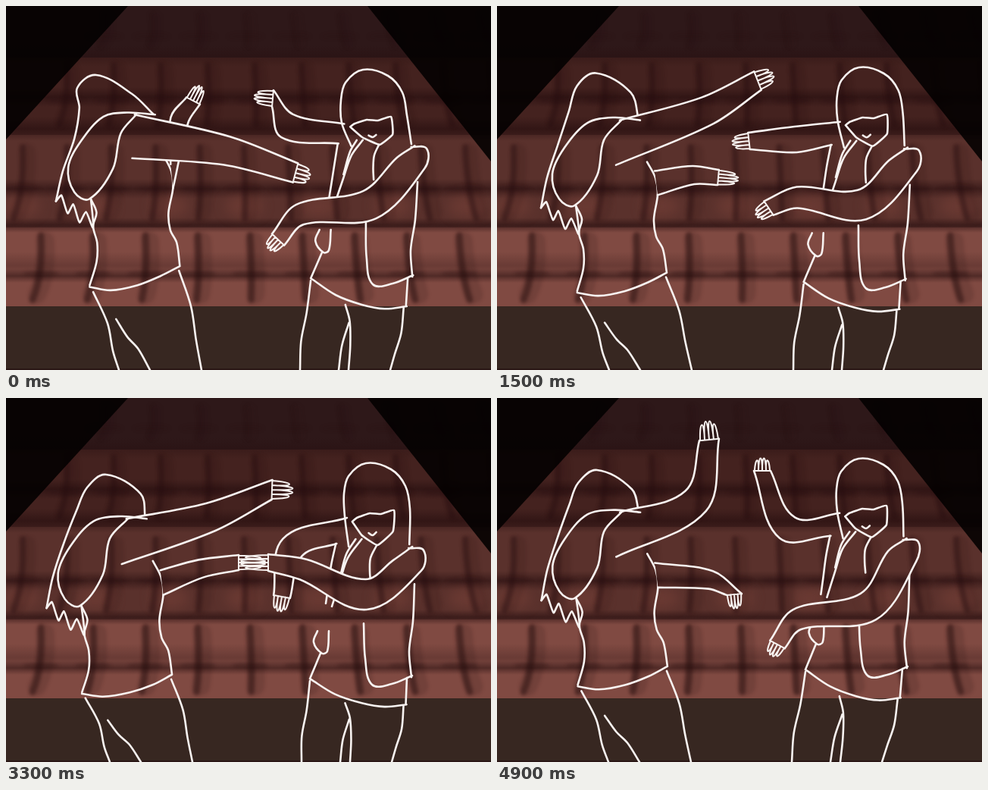
An HTML page with a canvas for the animation above (5000 ms loop, 640 by 480 pixels).

```html
<!DOCTYPE html>
<html lang="en">
<head>
<meta charset="utf-8">
<title>Two dancers</title>
<style>
html, body { margin: 0; width: 100%; height: 100%; overflow: hidden; background: #060303; }
canvas { position: absolute; left: 0; top: 0; width: 640px; height: 480px; }
</style>
</head>
<body>
<canvas id="wall" width="640" height="480"></canvas>
<canvas id="ink" width="640" height="480"></canvas>
<script>
const LOOP = 5000, STEP = 100;

// A track is a list of rows: time, then the values at that time.
const smooth = u => u * u * (3 - 2 * u);
function at(track, t) {
  const i = track.findLastIndex(row => row[0] <= t), a = track[i], b = track[i + 1] || a;
  const e = a === b ? 0 : smooth((t - a[0]) / (b[0] - a[0]));
  return a.slice(1).map((v, k) => v + (b[k + 1] - v) * e);
}
const points = text => text.split(' ').map(p => p.split(',').map(Number));

// body rows: time, head dx dy, chest dx dy, hip dx dy, feet dx
// arm rows: time, joints x y ..., hand angle, hand length
const left = {
  levels: [110, 160, 370, 480],
  body: [
    [0, -8, 4, 15, -12, 9, -13, 3],
    [1000, 7, 3, 8, -6, 8, -9, 4],
    [2000, 0, 0, 0, 0, 0, 0, 0],
    [2800, 4, 7, 2, 9, 0, -4, -5],
    [3300, 5, 14, 0, 5, -1, 9, -9],
    [4300, 21, 12, 9, 9, 3, 12, -1],
    [4900, 5, 8, 4, -4, 5, -2, 1]
  ],
  near: {
    a: points('158,153'), b: points('153,213'), half: [19, 13],
    track: [
      [0, 292, 191, 382, 220, 15, 20],
      [400, 263, 130, 289, 48, -86, 29],
      [1000, 270, 148, 366, 128, 35, 22],
      [2000, 285, 128, 322, 69, -78, 23],
      [2800, 275, 190, 357, 150, -48, 34],
      [3300, 270, 157, 351, 121, 2, 28],
      [4300, 298, 221, 352, 193, -66, 20],
      [4900, 262, 136, 280, 55, -95, 25]
    ]
  },
  far: {
    a: points('204,221'), b: points('208,253'), half: [12, 10],
    track: [
      [0, 229, 150, 247, 125, -63, 22],
      [1000, 252, 213, 296, 195, -38, 28],
      [2000, 266, 233, 288, 257, 48, 26],
      [2800, 258, 217, 282, 225, 62, 24],
      [3300, 257, 225, 307, 217, 0, 36],
      [4300, 250, 243, 272, 252, 72, 28],
      [4900, 282, 240, 313, 259, 85, 19]
    ]
  },
  strokes: [
    '194,209 205,230 208,252 203,285 206,308 215,325 220,356',
    '100,267 108,285 104,303 110,325 110,350 102,380',
    '102,382 130,386 165,380 195,369 220,356',
    '107,388 128,425 137,458 146,480',
    '219,362 237,405 246,445 255,480',
    '139,420 155,441 170,455 187,480',
    '183,152 173,113 127,87 102,104 91,140 76,187 62,230 54,270'
  ],
  sharp: ['54,270 61,262 70,286 77,274 86,298 94,284 104,305 100,267'],
  top: ['185,153 150,149 115,157 85,190 69,225 78,258 98,267 128,227 137,180 160,153']
};

const right = {
  levels: [150, 200, 375, 480],
  body: [
    [0, -4, 4, 4, -8, 0, -8, -1],
    [1000, 5, 2, 11, -9, 5, -6, 4],
    [2000, 0, 0, 0, 0, 0, 0, 0],
    [2800, 1, 2, 1, 7, 1, 2, 0],
    [3300, 0, 6, -1, 6, -1, 3, 1],
    [4300, 4, 15, 3, 8, 1, 6, 5],
    [4900, 2, 0, 4, -6, 5, -9, 0]
  ],
  near: {
    a: points('532,192 552,195 549,222'), b: points('537,190 512,208'), half: [20, 14, 11],
    track: [
      [0, 480, 262, 388, 275, 359, 308, 133, 18],
      [1000, 489, 254, 404, 217, 362, 208, 170, 22],
      [2000, 474, 270, 388, 288, 355, 325, 123, 17],
      [2800, 482, 277, 395, 316, 364, 349, 138, 15],
      [3300, 475, 259, 392, 226, 346, 217, 180, 37],
      [4300, 484, 275, 393, 264, 356, 282, 126, 19],
      [4900, 490, 275, 396, 292, 370, 325, 118, 17]
    ]
  },
  far: {
    a: points('437,186'), b: points('450,152'), half: [17, 11],
    track: [
      [0, 371, 158, 352, 122, 185, 25],
      [1000, 393, 180, 322, 200, 167, 23],
      [2000, 395, 172, 343, 156, 180, 22],
      [2800, 376, 176, 376, 90, 270, 19],
      [3300, 378, 197, 364, 262, 100, 20],
      [4300, 388, 181, 325, 175, 205, 27],
      [4900, 383, 171, 350, 96, 270, 17]
    ]
  },
  strokes: [
    '453,190 447,150 446,120 452,97 475,80 508,88 527,110 533,140 533,187',
    '479,172 484,175 489,171',
    '470,180 452,205 442,235 431,270',
    '462,180 450,200 442,230',
    '490,188 482,205 481,222 482,237',
    '436,186 430,215 426,245 423,266',
    '540,240 538,290 533,330 536,365',
    '473,293 475,340 484,375 510,374 537,363',
    '412,303 407,318 418,333 425,330 427,303',
    '416,333 409,350 402,367',
    '402,367 435,388 470,400 500,405 529,402',
    '530,366 528,402',
    '402,370 397,410 390,445 389,480',
    '448,400 454,420 455,450 453,480',
    '453,422 444,450 440,480',
    '525,404 522,435 514,460 508,480'
  ],
  sharp: ['457,157 463,152 480,146 495,147 512,142 511,170 491,188 470,175 457,157'],
  top: []
};

const g = document.getElementById('ink').getContext('2d');
g.strokeStyle = '#f8f3f1';
g.lineCap = g.lineJoin = 'round';

// Adds a smooth line through points; k sets the handle length.
function trace(p, k = 0.33, join = false) {
  const dir = i => {
    const a = p[Math.max(0, i - 1)], b = p[Math.min(p.length - 1, i + 1)];
    const d = Math.hypot(b[0] - a[0], b[1] - a[1]) || 1;
    return [(b[0] - a[0]) / d, (b[1] - a[1]) / d];
  };
  if (join) g.lineTo(...p[0]); else g.moveTo(...p[0]);
  for (let i = 0; i < p.length - 1; i++) {
    const [ax, ay] = p[i], [bx, by] = p[i + 1], u = dir(i), v = dir(i + 1);
    const h = Math.hypot(bx - ax, by - ay) * k;
    g.bezierCurveTo(ax + u[0] * h, ay + u[1] * h, bx - v[0] * h, by - v[1] * h, bx, by);
  }
}

// Shifts a point by the body offsets of the levels above and below it.
function warper({ levels, body }, t) {
  const o = [...at(body, t), 0];
  return ([x, y]) => {
    const i = Math.max(0, Math.min(2, levels.findLastIndex(l => l <= y)));
    const u = Math.max(0, Math.min(1, (y - levels[i]) / (levels[i + 1] - levels[i])));
    const mix = k => o[2 * i + k] * (1 - u) + o[2 * i + 2 + k] * u;
    return [x + mix(0), y + mix(1)];
  };
}

// Four finger loops fanned across the wrist.
function hand([x, y], half, ang, len) {
  const c = Math.cos(ang), s = Math.sin(ang);
  const place = (along, across) => [x + c * along + s * across, y + s * along - c * across];
  g.lineWidth = 2;
  g.beginPath();
  g.moveTo(...place(0, half));
  g.lineTo(...place(0, -half));
  for (let i = 0; i < 4; i++) {
    const mid = (i - 1.5) * half * 0.46, w = half * 0.23;
    const reach = len * (i % 3 ? 1.3 : 1.08), tip = mid * 0.85;
    g.moveTo(...place(0, mid - w));
    g.bezierCurveTo(...place(reach, tip - w), ...place(reach, tip + w), ...place(0, mid + w));
  }
  g.stroke();
}

// Sleeve outline around the joints; it hides whatever lies behind it.
function arm({ a, b, half, track }, warp, t) {
  const v = at(track, t), len = v.pop(), ang = v.pop() * Math.PI / 180;
  const sideA = a.map(warp), sideB = b.map(warp);
  const endA = sideA.at(-1), endB = sideB.at(-1);
  const joints = [[(endA[0] + endB[0]) / 2, (endA[1] + endB[1]) / 2]];
  for (let i = 0; i < v.length; i += 2) joints.push([v[i], v[i + 1]]);
  half.forEach((w, i) => {
    const p = joints[i], [x, y] = joints[i + 1], q = joints[i + 2];
    const dir = q ? Math.atan2(q[1] - p[1], q[0] - p[0]) : ang;
    const nx = Math.sin(dir) * w, ny = -Math.cos(dir) * w;
    sideA.push([x + nx, y + ny]);
    sideB.push([x - nx, y - ny]);
  });
  g.globalCompositeOperation = 'destination-out';
  g.beginPath();
  trace(sideA);
  trace([...sideB].reverse(), 0.33, true);
  g.fill();
  g.globalCompositeOperation = 'source-over';
  g.lineWidth = 2.6;
  g.beginPath();
  trace(sideA);
  trace(sideB);
  g.stroke();
  hand(joints.at(-1), half.at(-1), ang, len);
}

function lines(list, warp, k) {
  g.lineWidth = 2.6;
  g.beginPath();
  list.forEach(s => trace(points(s).map(warp), k));
  g.stroke();
}

function body(who, warp) {
  lines(who.strokes, warp);
  lines(who.sharp, warp, 0.1);
}

function paintWall() {
  const c = document.getElementById('wall').getContext('2d');
  const dark = a => `rgba(38,14,15,${a})`;
  const box = (color, y, h) => { c.fillStyle = color; c.fillRect(0, y, 640, h); };
  const blot = (color, x, y, rx, ry) => {
    c.fillStyle = color;
    c.beginPath();
    c.ellipse(x, y, rx, ry, 0, 0, 7);
    c.fill();
  };
  const band = (y, r, alpha) => {
    const f = c.createLinearGradient(0, y - r, 0, y + r);
    [0, alpha, 0].forEach((a, i) => f.addColorStop(i / 2, dark(a)));
    box(f, y - r, 2 * r);
  };
  // Upright strokes lean outward, as seen from the middle of the room.
  const strokes = (x0, gap, y0, y1, w, alpha) => {
    const mid = (y0 + y1) / 2;
    for (let x = x0; x < 640; x += gap) {
      const lean = (x - 290) * 0.045;
      [[w * 2.6, 0.3, 6], [w, 1, 0]].forEach(([width, part, dx]) => {
        c.strokeStyle = dark(alpha * part);
        c.lineWidth = width;
        c.beginPath();
        c.moveTo(x + dx, y0 + width / 2);
        c.quadraticCurveTo(x + dx + 3, mid + 10, x + dx + lean, y1 - width / 2);
        c.stroke();
      });
      blot(dark(alpha * 0.5), x, mid + 8, 24, 4);
    }
  };

  box('#2e1819', 0, 68);
  box('#44221f', 68, 102);
  box('#5a312c', 170, 122);
  box('#804a42', 292, 104);
  band(66, 14, 0.35);
  band(120, 13, 0.6);
  band(162, 16, 0.6);
  band(241, 13, 0.55);
  band(289, 10, 0.6);
  band(342, 18, 0.25);
  band(356, 9, 0.5);

  c.lineCap = 'round';
  c.filter = 'blur(8px)';
  for (let x = 20; x < 640; x += 98) blot('rgba(130,70,60,.4)', x, 264, 25, 14);
  c.filter = 'blur(2px)';
  strokes(130, 62, 8, 56, 5, 0.22);
  strokes(80, 62, 74, 160, 8, 0.4);
  strokes(22, 58.4, 182, 284, 8, 0.4);
  strokes(46, 69, 298, 392, 9, 0.5);
  c.filter = 'none';
  box('#372721', 396, 84);
  box('#2a1715', 478, 2);

  // darkness on both sides of the beam
  c.fillStyle = 'rgba(3,1,1,.88)';
  for (const [x, edge, y] of [[0, 161, 176], [640, 477, 205]]) {
    c.beginPath();
    c.moveTo(x, 0);
    c.lineTo(edge, 0);
    c.lineTo(x, y);
    c.fill();
  }
}

let last = -1;
function draw(now) {
  const t = Math.floor(now % LOOP / STEP) * STEP;
  if (t !== last) {
    last = t;
    g.clearRect(0, 0, 640, 480);
    const warpL = warper(left, t), warpR = warper(right, t);
    arm(right.far, warpR, t);
    body(left, warpL);
    arm(left.far, warpL, t);
    arm(left.near, warpL, t);
    lines(left.top, warpL);
    body(right, warpR);
    arm(right.near, warpR, t);
  }
  requestAnimationFrame(draw);
}

paintWall();
draw(0);
</script>
</body>
</html>
```
